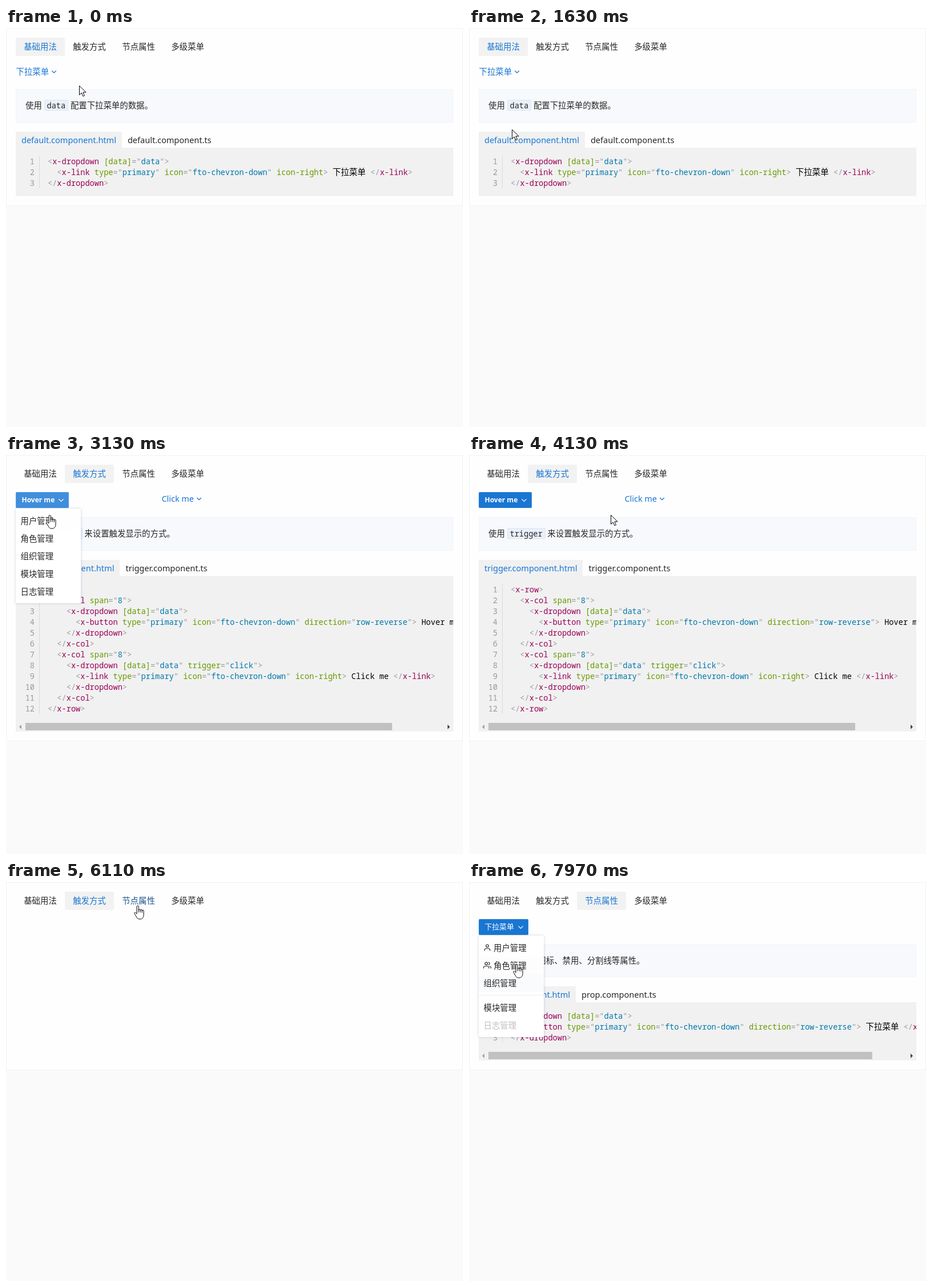
These frames come from a looping animation (800x700 px, 8 s). An HTML page:

```html
<!DOCTYPE html>
<html lang="zh-CN">
<head>
<meta charset="utf-8">
<title>Dropdown</title>
<style>
html, body { margin: 0; width: 100%; height: 100%; overflow: hidden; background: #fafafa; }
#stage { position: absolute; left: 0; top: 0; width: 800px; height: 700px; overflow: hidden; background: #fafafa;
  font: 14.4px/20px 'Noto Sans', 'Noto Sans CJK SC', 'Noto Sans CJK', sans-serif; color: #262626; }
#stage div, #stage svg { position: absolute; box-sizing: border-box; white-space: pre; }
svg { fill: none; stroke: currentColor; stroke-width: 2; stroke-linecap: round; stroke-linejoin: round; overflow: visible; }
.card { background: #fefefe; border: 1px solid #f0f1f9; }
.tab { border-radius: 2px; line-height: 32px; text-align: center; }
.info { background: #f7f9fc; border: 1px solid #f1f4fa; }
.info code { font: 13.6px/17px 'Noto Sans Mono', 'DejaVu Sans Mono', monospace; background: #eaf0fa;
  border: 1px solid #dce6f5; border-radius: 2px; padding: 0 4px; display: inline-block; }
.files { display: flex; line-height: 28px; font-size: 14.52px; }
.files span { padding: 0 10px; }
.files span:first-child { background: #f1f1f1; color: #1976d2; }
.panel { background: #f1f1f1; overflow: hidden; color: #000;
  font: 13.63px/19px 'Noto Sans Mono', 'Noto Sans CJK SC', 'Noto Sans CJK', monospace; }
.num { color: #999; text-align: right; }
.p { color: #999; } .t { color: #905; } .a { color: #690; } .v { color: #07a; }
.zh { font-size: 14.5px; }
.btn { border-radius: 2px; color: #fff; font-size: 12.8px; line-height: 27px; padding-left: 10.5px;
  box-shadow: inset 0 0 0 1px rgba(255, 255, 255, .12); }
.menu { background: #fff; border-radius: 2px; box-shadow: 0 0 4px rgba(50, 80, 130, .26); width: 114px; }
.row { left: 0; width: 114px; height: 31px; line-height: 31px; padding-left: 8.5px; }
</style>
</head>
<body>
<div id="stage"></div>
<script>
const LOOP = 8000;
const stage = document.getElementById('stage');

function box(parent, x, y, w, h, cls = '', html = '') {
  const el = document.createElement('div');
  el.className = cls;
  el.innerHTML = html;
  Object.assign(el.style, { left: x + 'px', top: y + 'px' });
  if (w) el.style.width = w + 'px';
  if (h) el.style.height = h + 'px';
  parent.appendChild(el);
  return el;
}

const icon = (cx, cy, size, shape) =>
  `<svg viewBox="0 0 24 24" width="${size}" height="${size}" style="left:${cx - size / 2}px;top:${cy - size / 2}px">${shape}</svg>`;
const CHEVRON = '<path d="M6 9l6 6 6-6"/>';
const USER = '<path d="M20 21v-2a4 4 0 0 0-4-4H8a4 4 0 0 0-4 4v2"/><circle cx="12" cy="7" r="4"/>';
const USERS = '<path d="M17 21v-2a4 4 0 0 0-4-4H5a4 4 0 0 0-4 4v2M23 21v-2a4 4 0 0 0-3-3.87M16 3.13a4 4 0 0 1 0 7.75"/><circle cx="9" cy="7" r="4"/>';

// Syntax colouring
const tok = (c, s) => `<span class="${c}">${s}</span>`;
const attrs = s => s.replace(/([\w\[\]-]+)(?:="([^"]*)")?/g, (m, name, val) =>
  tok('a', name) + (val === undefined ? '' : tok('p', '="') + tok('v', val) + tok('p', '"')));
const paint = s => s
  .replace(/<(\/?)([\w-]+)([^>]*)>/g, (m, slash, tag, rest) =>
    tok('p', '&lt;' + slash) + tok('t', tag) + attrs(rest) + tok('p', '&gt;'))
  .replace(/[\u4e00-\u9fff]+/g, m => tok('zh', m));

const LINK = '<x-link type="primary" icon="fto-chevron-down" icon-right>';
const BUTTON = '<x-button type="primary" icon="fto-chevron-down" direction="row-reverse">';
const OPEN = '<x-dropdown [data]="data">';
const CLOSE = '</x-dropdown>';

const specs = [
  { from: 0, to: 2180, fade: 0, card: 312, info: [107, 59], file: 'default', y: 182, bottom: 295,
    text: '使用 <code>data</code> 配置下拉菜单的数据。',
    lines: [OPEN, `  ${LINK} 下拉菜单 </x-link>`, CLOSE],
    triggers: [{ x: 17, w: 73, label: '下拉菜单' }] },
  { from: 2300, to: 6060, fade: 260, card: 502, info: [109, 59], file: 'trigger', y: 184, bottom: 485, thumb: 642,
    text: '使用 <code>trigger</code> 来设置触发显示的方式。',
    lines: ['<x-row>', '  <x-col span="8">', '    ' + OPEN, `      ${BUTTON} Hover me </x-button>`, '    ' + CLOSE,
      '  </x-col>', '  <x-col span="8">', '    <x-dropdown [data]="data" trigger="click">',
      `      ${LINK} Click me </x-link>`, '    ' + CLOSE, '  </x-col>', '</x-row>'],
    triggers: [{ x: 17, w: 93, label: 'Hover me', button: true }, { x: 272, w: 72, label: 'Click me' }] },
  { from: 6230, to: LOOP, fade: 220, card: 330, info: [109, 58], file: 'prop', y: 183, bottom: 313, thumb: 672,
    text: '节点中可配置图标、禁用、分割线等属性。',
    lines: [OPEN, `  ${BUTTON} 下拉菜单 </x-button>`, CLOSE],
    triggers: [{ x: 17, w: 87, label: '下拉菜单', button: true }] },
];

const card = box(stage, 0, 0, 800, 312, 'card');
const tabs = ['基础用法', '触发方式', '节点属性', '多级菜单'].map((label, i) => {
  const area = [17 + 86 * i, 17, 86, 32];
  return { area, el: box(stage, ...area, 'tab', label) };
});

function buildTrigger(parent, tr) {
  const { x, w, label, button } = tr;
  tr.area = button ? [x, 65, w, 28] : [x, 67, w, 21];
  tr.el = box(parent, ...tr.area, button ? 'btn' : '', label + icon(w - (button ? 14 : 6), button ? 14 : 10, button ? 15 : 14, CHEVRON));
  if (label === 'Hover me') Object.assign(tr.el.style, { fontSize: '12px', fontWeight: 600 });
  if (!button) tr.el.style.paddingLeft = '.5px';
}

function buildScene(s) {
  const root = s.el = box(stage, 0, 0, 800, 700);
  s.triggers.forEach(tr => buildTrigger(root, tr));
  const info = box(root, 17, s.info[0], 766, s.info[1], 'info', s.text);
  info.style.padding = '18px 16px';
  box(root, 17, s.y, 0, 28, 'files', `<span>${s.file}.component.html</span><span>${s.file}.component.ts</span>`);
  const top = s.y + 28, h = s.bottom - top;
  const panel = box(root, 17, top, 766, h, 'panel');
  s.lines.forEach((line, i) => {
    box(panel, 0, 14 + 19 * i, 33, 19, 'num', i + 1);
    box(panel, 56, 14 + 19 * i, 0, 19, '', paint(line));
  });
  box(panel, 41, 14, 1, 19 * s.lines.length).style.background = '#d8dade';
  if (s.thumb) {
    box(panel, 0, h - 17, 766, 17).style.background = '#f1f1f1';
    box(panel, 17, h - 15, s.thumb, 13).style.background = '#c1c1c1';
    const arrow = (x, d, c) => `<svg width="6" height="8" style="left:${x}px;top:${h - 12.5}px;stroke:none;fill:${c}"><path d="${d}"/></svg>`;
    panel.insertAdjacentHTML('beforeend', arrow(6, 'M4 0v8L0 4z', '#a0a0a0') + arrow(756, 'M0 0v8l4-4z', '#404040'));
  }
}
specs.forEach(buildScene);

// Menus: position, time open and closed, fade-in length
const NAMES = ['用户管理', '角色管理', '组织管理', '模块管理', '日志管理'];
const menus = [
  { x: 17, y: 91, from: 360, to: 1625, fade: 100 },
  { x: 17, y: 94, from: 2740, to: 3620, fade: 90 },
  { x: 272, y: 91, from: 4470, to: 5470, fade: 180 },
  { x: 17, y: 94, from: 6850, to: LOOP, fade: 100, rich: true },
];
menus.forEach(m => {
  m.el = box(stage, m.x, m.y, 114, m.rich ? 178 : 166, 'menu');
  m.rows = NAMES.map((name, i) => {
    const y = 6 + 31 * i + (m.rich && i > 2 ? 12 : 0);
    const pic = m.rich && [USER, USERS][i];
    const el = box(m.el, 0, y, 114, 31, 'row', name + (pic ? icon(15, 15, 14, pic) : ''));
    if (pic) el.style.paddingLeft = '26px';
    if (m.rich && i === 4) el.style.color = '#bfbfbf';
    return { el, area: [m.x, m.y + y, 114, 31], off: m.rich && i === 4 };
  });
  if (m.rich) box(m.el, 0, 104, 114, 1).style.background = '#eceef2';
});

// Pointer
const shape = d => `<svg width="20" height="26" style="fill:#fff;stroke:#000;stroke-width:1">${d}</svg>`;
const arrow = box(stage, 0, 0, 20, 26, '', shape('<path d="M.5 .7V16.4L4.2 12.9 6.9 18.8 9.4 17.7 6.8 11.9H11.7Z"/>'));
const hand = box(stage, 0, 0, 20, 26, '', shape(
  '<path d="M5 14.5V2.2a1.6 1.6 0 0 1 3.2 0V8.4a1.5 1.5 0 0 1 3 .2a1.5 1.5 0 0 1 3 .7a1.4 1.4 0 0 1 2.8 .8V16c0 4.6-2 8-6 8H9.3c-2.4 0-4-1.6-5-3.8L.9 14.3c-.7-1.8 1.2-2.7 2.3-1.5z"/>' +
  '<path d="M8.2 8.4V12M11.2 8.6V12M14.2 9.3V12.5"/>'));

const path = [
  [70, 128, 101], [330, 70, 80], [710, 70, 80], [1000, 72, 130], [1390, 75, 178], [1630, 75, 178],
  [2060, 142, 42], [2480, 142, 42], [2700, 75, 82], [3090, 75, 82], [3130, 76, 105], [3440, 77, 186],
  [3620, 77, 186], [4300, 305, 78], [4800, 305, 78], [4840, 309, 120], [4880, 313, 134], [5000, 318, 157],
  [5150, 320, 187], [5470, 320, 187], [6060, 230, 41], [6360, 230, 41], [6640, 179, 84], [6810, 75, 80],
  [7180, 75, 80], [7300, 79, 112], [7640, 82, 201], [7760, 82, 200], [7840, 82, 178], [7920, 83, 166], [7970, 83, 144],
];

function pointer(t) {
  const i = path.findIndex(p => p[0] > t);
  if (i === 0) return path[0].slice(1);
  if (i < 0) return path[path.length - 1].slice(1);
  const [t0, x0, y0] = path[i - 1], [t1, x1, y1] = path[i];
  const k = (t - t0) / (t1 - t0);
  return [x0 + (x1 - x0) * k, y0 + (y1 - y0) * k];
}

const inside = ([px, py], [x, y, w, h]) => px >= x && px < x + w && py >= y && py < y + h;
const clamp = v => Math.max(0, Math.min(1, v));

// Share of the last 150 ms spent over an area, as a colour transition
function heat(t, area) {
  let n = 0;
  for (let i = 0; i < 10; i++) n += inside(pointer(t - 15 * i), area);
  return n / 10;
}
const mix = (a, b, k) => `rgb(${a.map((v, i) => Math.round(v + (b[i] - v) * k))})`;
const INK = [38, 38, 38], BLUE = [25, 118, 210], LIGHT = [74, 148, 222], WHITE = [255, 255, 255], TINT = [247, 249, 251];

const level = (t, o) => t < o.from || t >= o.to ? 0 : o.fade ? clamp((t - o.from) / o.fade) : 1;
const show = (el, v) => {
  el.style.opacity = v;
  el.style.visibility = v > 0 ? 'visible' : 'hidden';
};

function draw(t) {
  const pos = pointer(t);
  let click = false;
  card.style.height = specs[t < 2180 ? 0 : t < 6060 ? 1 : 2].card + 'px';

  const active = t < 2290 ? 0 : t < 6200 ? 1 : 2;
  tabs.forEach(({ el, area }, i) => {
    const on = i === active;
    el.style.background = on ? '#f2f2f2' : 'none';
    el.style.color = mix(INK, BLUE, on ? 1 : heat(t, area));
    click = click || inside(pos, area);
  });

  specs.forEach(s => {
    const v = level(t, s);
    show(s.el, v);
    if (!v) return;
    s.triggers.forEach(({ el, area, button }) => {
      el.style[button ? 'background' : 'color'] = mix(BLUE, LIGHT, heat(t, area));
      click = click || inside(pos, area);
    });
  });

  menus.forEach(m => {
    const v = level(t, m);
    show(m.el, v);
    if (!v) return;
    m.rows.forEach(({ el, area, off }) => {
      el.style.background = mix(WHITE, TINT, off ? 0 : heat(t, area));
      click = click || inside(pos, area);
    });
  });

  show(hand, click ? 1 : 0);
  show(arrow, click ? 0 : 1);
  hand.style.transform = `translate(${Math.round(pos[0]) - 6}px, ${Math.round(pos[1])}px)`;
  arrow.style.transform = `translate(${Math.round(pos[0])}px, ${Math.round(pos[1])}px)`;
}

const start = performance.now();
function tick() {
  draw((performance.now() - start) % LOOP);
  requestAnimationFrame(tick);
}
tick();
</script>
</body>
</html>
```
